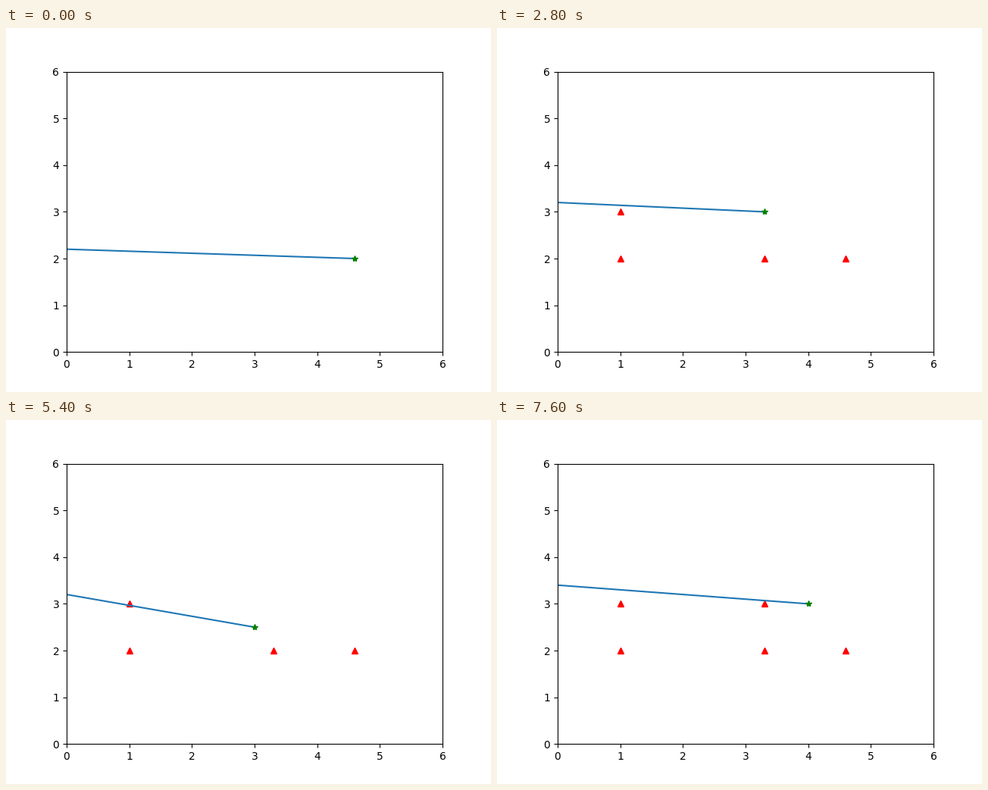
These frames come from a looping animation (640 px wide and 480 px high, 7800 ms). A matplotlib script:

```python
import matplotlib.pyplot as plt
from matplotlib.animation import FuncAnimation

POINTS = {
    "A": (1.3, 2.25), "B": (1.3, 2.75), "C": (2, 2.5), "D": (3, 2.5),
    "E": (3.3, 3), "F": (4, 2), "G": (4, 3), "H": (4.6, 2),
    "J": (3.3, 2), "K": (1, 3), "L": (1, 2),
}

# base height, route of the star, whether the last stop keeps a marker
STAGES = [
    (2.2, "H", True),
    (2.4, "J", True),
    (2.6, "CK", True),
    (2.8, "DACGB", False),
    (3.0, "FDEL", True),
    (3.2, "AECDACDBGFACFGDE", True),
    (3.4, "BCAFDGBCDG", False),
]


def build_steps():
    steps, kept = [], []
    for base, route, keep in STAGES:
        for name in route:
            steps.append((base, POINTS[name], list(kept)))
        if keep:
            kept.append(POINTS[route[-1]])
    return steps


steps = build_steps()

fig, ax = plt.subplots(figsize=(6.4, 4.8), dpi=100)
ax.set_xlim(0, 6)
ax.set_ylim(0, 6)

marks, = ax.plot([], [], "r^")
line, = ax.plot([], [], color="C0")
star, = ax.plot([], [], "g*")


def update(i):
    base, (x, y), kept = steps[i]
    marks.set_data([p[0] for p in kept], [p[1] for p in kept])
    line.set_data([0, x], [base, y])
    star.set_data([x], [y])
    return marks, line, star


anim = FuncAnimation(fig, update, frames=len(steps), interval=200,
                     repeat=True, repeat_delay=0)
plt.show()
```
